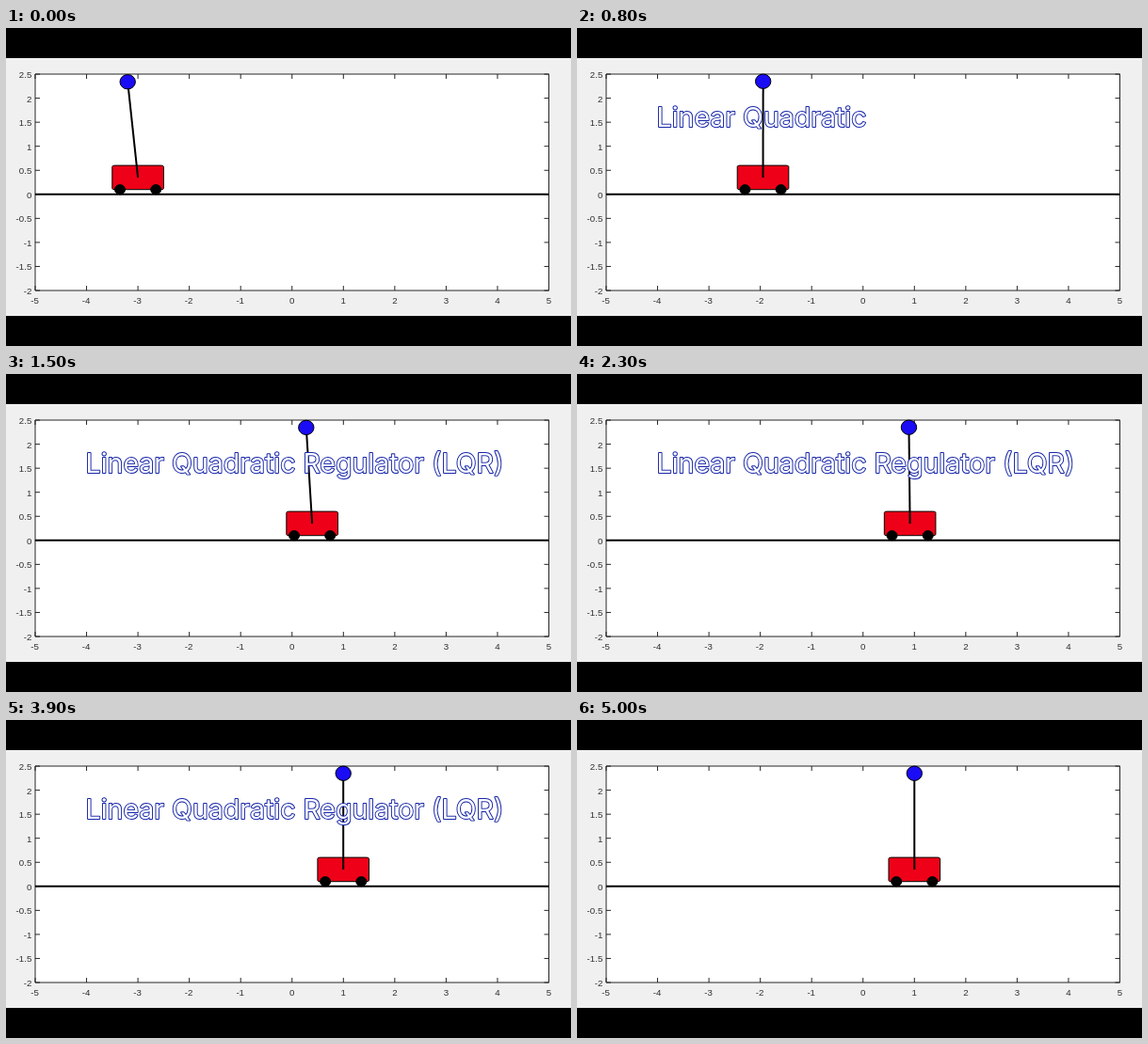
Write an HTML page that moves like this. It is 600 px wide and 338 px high and loops after 5.1 s.

```html
<!DOCTYPE html>
<html lang="en">
<head>
<meta charset="utf-8">
<title>Cart and pendulum</title>
<style>
  html, body { margin: 0; width: 100%; height: 100%; overflow: hidden; background: #000; }
  svg { display: block; width: 600px; height: 338px; }
  .labels { font: 9.7px "Liberation Sans", Arial, sans-serif; fill: #303030; }
  .axes { fill: none; stroke: #262626; stroke-width: 1; }
  .title {
    font: 400 28.5px Inter, sans-serif;
    fill: #fff; stroke: #1726a8; stroke-width: 1.9;
    stroke-linejoin: round; paint-order: stroke; white-space: pre;
  }
</style>
</head>
<body>
<svg viewBox="0 0 600 338">
  <rect y="32" width="600" height="274" fill="#f0f0f0"/>
  <rect x="31" y="49" width="545.5" height="230" fill="#fff"/>
  <path class="axes" id="axes"/>
  <g class="labels" id="labels"></g>
  <path d="M31 176.8H576.5" stroke="#000" stroke-width="2"/>
  <g id="cart" stroke="#000">
    <rect x="-27.3" y="146.1" width="54.6" height="25.6" rx="2.7" ry="1.3" fill="#ee0018"/>
    <ellipse cx="-19.1" cy="171.7" rx="5.5" ry="5.1"/>
    <ellipse cx="19.1" cy="171.7" rx="5.5" ry="5.1"/>
    <line id="pole" y1="158.9" stroke-width="2"/>
    <ellipse id="bob" rx="8.2" ry="7.7" fill="#1a0cf5"/>
  </g>
  <text class="title" id="title" x="84.6" y="105"></text>
</svg>
<script>
const $ = id => document.getElementById(id);
const LOOP = 5100, STEP = 100;
const TITLE = "Linear Quadratic Regulator (LQR)";
const px = x => 303.75 + 54.55 * x;
const py = y => 176.8 - 51.1 * y;

function drawAxes() {
  let d = "M31 49H576.5V279H31Z", text = "";
  const label = (x, y, anchor, v) =>
    text += `<text x="${x}" y="${y}" text-anchor="${anchor}">${v}</text>`;
  for (let x = -5; x <= 5; x++) {
    d += `M${px(x)} 279v-5M${px(x)} 49v5`;
    label(px(x) - (x < 0 ? 0.5 : 0), 292.6, "middle", x);
  }
  for (let y = -2; y <= 2.5; y += 0.5) {
    d += `M31 ${py(y)}h5M576.5 ${py(y)}h-5`;
    label(27.3, py(y) + 3.9, "end", y);
  }
  $("axes").setAttribute("d", d);
  $("labels").innerHTML = text;
}

// Inverted pendulum on a cart, steered by state feedback
const m = 1, M = 5, L = 2, g = -10, drag = 1;
const GAIN = [-100, -197.54, 1491.28, 668.44];
const GOAL = [1, 0, Math.PI, 0];
const DT = 0.005, SPAN = 12;

function slope(s) {
  const [, v, th, w] = s;
  const u = -GAIN.reduce((sum, k, i) => sum + k * (s[i] - GOAL[i]), 0);
  const sin = Math.sin(th), cos = Math.cos(th);
  const D = m * L * L * (M + m * (1 - cos * cos));
  const push = m * L * w * w * sin - drag * v + u;
  return [
    v,
    (-m * m * L * L * g * cos * sin + m * L * L * push) / D,
    w,
    ((m + M) * m * g * L * sin - m * L * cos * push) / D
  ];
}

function simulate() {
  const add = (s, k, h) => s.map((a, i) => a + h * k[i]);
  let s = [-3, 0, Math.PI + 0.1, 0];
  const path = [s];
  for (let n = 0; n < SPAN / DT; n++) {
    const a = slope(s), b = slope(add(s, a, DT / 2));
    const c = slope(add(s, b, DT / 2)), e = slope(add(s, c, DT));
    s = s.map((q, i) => q + DT / 6 * (a[i] + 2 * b[i] + 2 * c[i] + e[i]));
    path.push(s);
  }
  return path;
}

const path = simulate();
const clamp = (v, lo, hi) => Math.min(hi, Math.max(lo, v));
const set = (el, attrs) => {
  for (const k in attrs) el.setAttribute(k, attrs[k]);
};

function render(ms) {
  const simTime = Math.max(0, ms - 284) * 0.00245;
  const s = path[Math.min(path.length - 1, Math.round(simTime / DT))];
  const bx = 54.55 * L * Math.sin(s[2]);
  const by = py(0.35 - L * Math.cos(s[2]));
  set($("cart"), { transform: `translate(${px(s[0])} 0)` });
  set($("pole"), { x2: bx, y2: by });
  set($("bob"), { cx: bx, cy: by });

  const typed = clamp(Math.floor((ms - 300) / 30), 0, TITLE.length);
  $("title").textContent = TITLE.slice(0, typed);
  set($("title"), { opacity: clamp((4500 - ms) / 400, 0, 1) });
}

drawAxes();
const start = performance.now();
function tick() {
  const t = (performance.now() - start) % LOOP;
  render(Math.floor(t / STEP) * STEP);
  requestAnimationFrame(tick);
}
tick();
</script>
</body>
</html>
```
